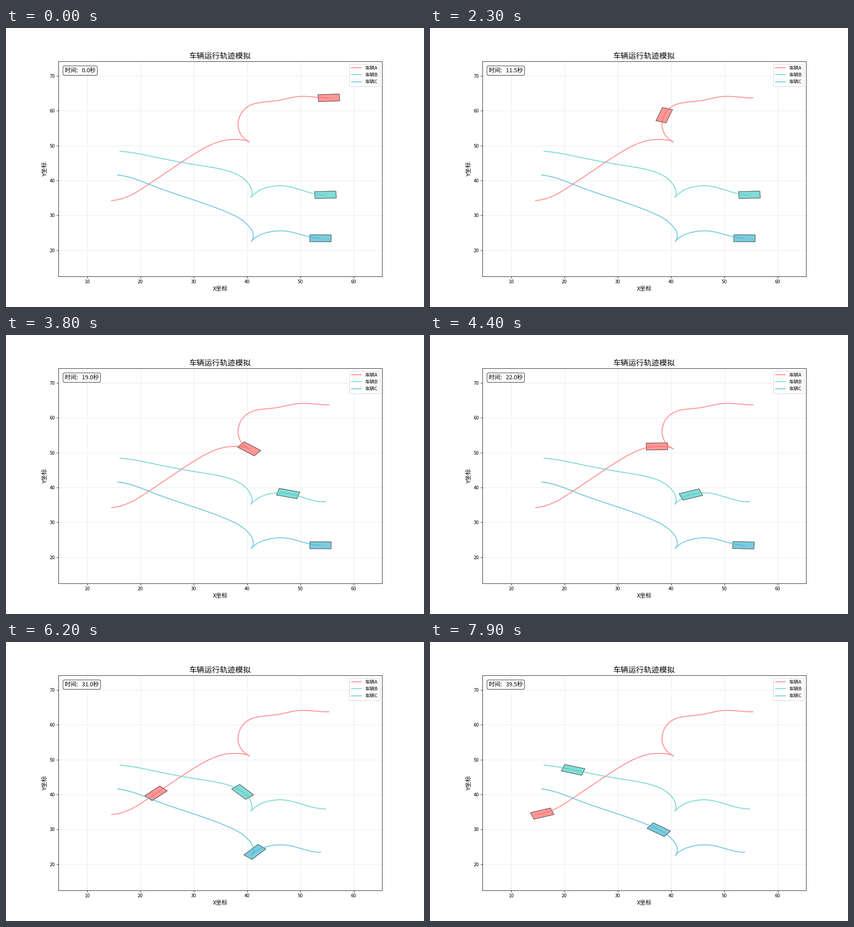
A matplotlib script that plays this animation: 917 by 611 pixels, repeating every 8000 ms.

```python
import numpy as np
import matplotlib.pyplot as plt
from matplotlib.animation import FuncAnimation
from matplotlib.patches import Polygon

plt.rcParams["font.family"] = ["Noto Sans CJK JP"]

DPI = 76.375
FRAMES, STEP = 80, 0.5
LENGTH, WIDTH = 4, 2
CORNERS = np.array([(-1, -1), (1, -1), (1, 1), (-1, 1)]) * [LENGTH / 2, WIDTH / 2]
SAMPLES = 200


def hermite(q, p0, p1, d0, d1):
    """Cubic from p0 to p1 with end slopes d0, d1 for q in 0..1."""
    ease = q * q * (3 - 2 * q)
    return p0 + (p1 - p0) * ease + q * (1 - q) * (d0 * (1 - q) - d1 * q)


class Car:
    """Backs up to the turning pose, then drives forward to the last one."""

    def __init__(self, ax, name, color, turn, poses):
        self.t, x, y, heading = np.array(poses, float).T
        nodes = np.column_stack([x, y])
        rad = np.radians(heading)
        self.trace(nodes, np.column_stack([np.cos(rad), np.sin(rad)]), turn)
        self.pace(turn)
        ax.plot(*self.xy.T, color=color, lw=2, alpha=0.7, label=name)
        self.body = ax.add_patch(Polygon(CORNERS, closed=True, facecolor=color,
                                         edgecolor="black", alpha=0.7))

    def trace(self, nodes, facing, turn):
        q = np.linspace(0, 1, SAMPLES)[:, None]
        parts, angles = [], []
        for i in range(len(nodes) - 1):
            gear = -1 if i < turn else 1
            a, b = nodes[i:i + 2]
            pull = gear * np.hypot(*(b - a))
            part = hermite(q, a, b, pull * facing[i], pull * facing[i + 1])
            dx, dy = gear * np.gradient(part, axis=0).T
            parts.append(part)
            angles.append(np.arctan2(dy, dx))
        self.xy = np.vstack(parts)
        self.angle = np.unwrap(np.concatenate(angles))
        steps = np.hypot(*np.diff(self.xy, axis=0).T)
        self.s = np.r_[0, np.cumsum(steps)]

    def pace(self, turn):
        """Speeds at the poses, at rest at both ends and at the turn."""
        self.key = np.r_[0, self.s[SAMPLES - 1::SAMPLES]]
        rate = np.diff(self.key) / np.diff(self.t)
        self.v = np.gradient(self.key, self.t)
        self.v[1:-1] = np.minimum(self.v[1:-1],
                                  2.5 * np.minimum(rate[1:], rate[:-1]))
        self.v[[0, turn, -1]] = 0

    def move(self, t):
        t = np.clip(t, self.t[0], self.t[-1])
        i = min(np.searchsorted(self.t, t, side="right") - 1, len(self.t) - 2)
        h = self.t[i + 1] - self.t[i]
        s = hermite((t - self.t[i]) / h, self.key[i], self.key[i + 1],
                    h * self.v[i], h * self.v[i + 1])
        x, y, a = (np.interp(s, self.s, c) for c in (*self.xy.T, self.angle))
        c, n = np.cos(a), np.sin(a)
        self.body.set_xy(CORNERS @ np.array([[c, n], [-n, c]]) + [x, y])


fig, ax = plt.subplots(figsize=(12.00655, 8), dpi=DPI)

# Key poses: time, x, y, heading in degrees.
cars = [
    Car(ax, "车辆A", "#FF6B6B", 5, [
        (0, 55.36, 63.74, 3), (4.2, 50.55, 64.16, 0), (7, 45.14, 62.82, 10.4),
        (9, 41.1, 61.9, 28), (16, 38.75, 53.49, 110), (18.7, 40.46, 51.07, 140),
        (22, 37.37, 51.79, 181), (26.5, 31.18, 48.58, 221.5),
        (31, 22.95, 40.34, 224.7), (39.5, 15.86, 34.52, 199.7),
        (43, 14.62, 34.26, 183)]),
    Car(ax, "车辆B", "#4ECDC4", 3, [
        (13.9, 54.72, 35.89, 2.5), (20, 46.18, 38.49, 0), (22, 43.75, 37.99, 20),
        (24.8, 40.72, 35.21, 57), (26.5, 40.97, 35.93, 87),
        (31, 39.2, 40.74, 131), (35.5, 30, 44.6, 166),
        (39.5, 21.67, 47.07, 162), (44.5, 16.2, 48.41, 173)]),
    Car(ax, "车辆C", "#45B7D1", 3, [
        (21.4, 53.79, 23.42, 0), (26.5, 46.91, 25.52, -5.6),
        (31, 41.49, 23.51, 49), (32.4, 40.8, 22.5, 60),
        (39.5, 37.72, 29.9, 144), (47, 21.6, 38.95, 148),
        (52, 15.77, 41.57, 170)]),
]

route = np.vstack([car.xy for car in cars])
(x0, y0), (x1, y1) = route.min(axis=0) - 10, route.max(axis=0) + 10
ax.set_xlim(x0, x1)
ax.set_ylim(y0, y1)
ax.grid(True, alpha=0.3)
ax.set_title("车辆运行轨迹模拟", fontsize=16)
ax.set_xlabel("X坐标", fontsize=12)
ax.set_ylabel("Y坐标", fontsize=12, labelpad=3)
ax.legend(loc="upper right")
clock = ax.text(0.02, 0.95, "", transform=ax.transAxes, fontsize=12,
                bbox=dict(boxstyle="round", facecolor="white", alpha=0.8))


def update(frame):
    t = frame * STEP
    for car in cars:
        car.move(t)
    clock.set_text(f"时间:   {t:.1f}秒")
    return [clock, *(car.body for car in cars)]


anim = FuncAnimation(fig, update, frames=FRAMES, interval=100,
                     repeat=True, repeat_delay=0)
plt.show()
```
